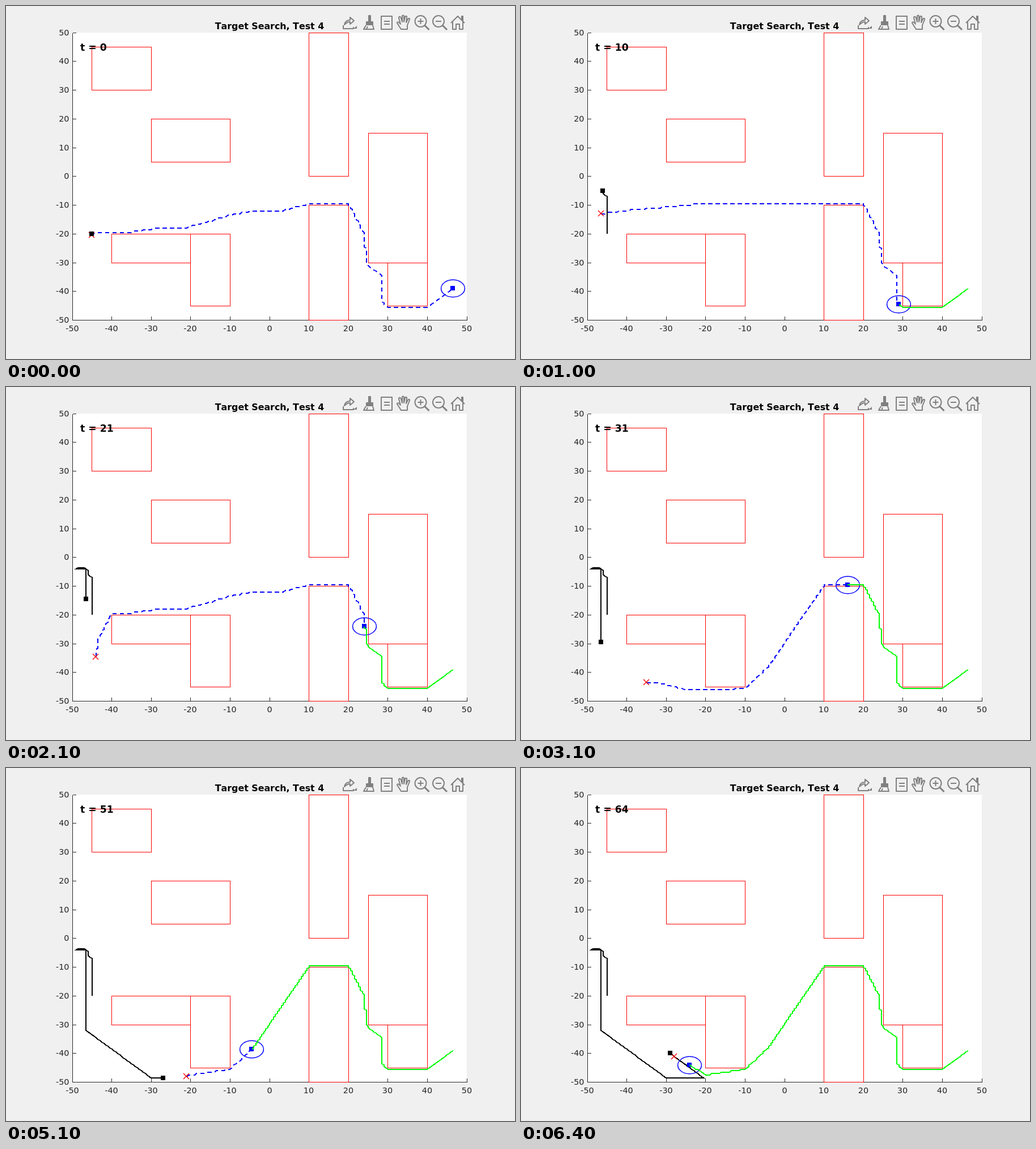
An HTML page for the animation above (7.4 s loop, 898 by 623 pixels).

```html
<!DOCTYPE html>
<html lang="en">
<head>
<meta charset="utf-8">
<title>Target Search</title>
<style>
  html, body { margin: 0; width: 100%; height: 100%; overflow: hidden; background: #f0f0f0; }
  svg { display: block; width: 898px; height: 623px; }
  text { font-family: "DejaVu Sans", sans-serif; font-size: 14.4px; fill: #262626; font-kerning: none; }
  .bold { font-weight: bold; fill: #000; }
  .crisp { shape-rendering: crispEdges; }
  path, ellipse { fill: none; }
</style>
</head>
<body>
<svg viewBox="0 0 898 623">
  <rect width="898" height="623" fill="#f0f0f0"/>
  <rect x="117" y="47" width="696" height="508" fill="#fff"/>
  <g id="axes"></g>
  <g id="walls" class="crisp" stroke="#f00"></g>
  <text class="bold" x="465" y="40.5" text-anchor="middle" style="font-size:15.85px">Target Search, Test 4</text>
  <g id="tools" fill="none" stroke="#808080" stroke-width="2" stroke-linejoin="round">
    <path d="M595 34v6h18v-3M597 33c1-6 5-8 10-8v-5l7 6-7 6v-4c-4 0-7 2-10 5z"/>
    <path d="M619 35v5h-6z" style="fill:#808080" stroke="none"/>
    <path d="M640 17h3v11h4v5h-11v-5h4z" style="fill:#808080"/>
    <path d="M635 34l-4 7h18l-2-7M638 36l-2 5"/>
    <path d="M662 18h19v23h-19zM667 27h10M667 32h10"/>
    <path d="M697 41l-7-11c0-3 3-2 6 2l-3-11c0-3 3-3 4 0l2 7v-10c0-2 3-2 3 0v10l2-9c1-2 4-1 3 1l-1 9 3-6c1-2 4-1 3 1l-4 10v7z"/>
    <path d="M785 30l12-12 12 12M788 28v13h6v-9h6v9h6v-13M804 24v-6h2v8"/>
  </g>
  <path id="plan" class="crisp" stroke="#00f" stroke-width="2" stroke-dasharray="7.5 5.5"/>
  <path id="evaderTrail" class="crisp" stroke="#000" stroke-width="2"/>
  <path id="goal" stroke="#f00" stroke-width="1.4" d="M-5 -5L5 5M-5 5L5 -5"/>
  <rect id="evader" x="-4" y="-4" width="8" height="8"/>
  <g id="seeker">
    <rect x="-4" y="-4" width="8" height="8" fill="#00f"/>
    <ellipse cx=".5" cy=".5" rx="20.9" ry="15.2" stroke="#00f" stroke-width="1.5"/>
  </g>
  <path id="seekerTrail" class="crisp" stroke="#0f0" stroke-width="2"/>
  <text id="clock" class="bold" x="131" y="79" style="font-size:17.3px"></text>
</svg>
<script>
const $ = id => document.getElementById(id);
const STEP = 100, LAST = 64, LOOP = 7400;
const px = x => 117 + (x + 50) * 6.96;
const py = y => 47 + (50 - y) * 5.077;
const hair = v => Math.floor(v) + 0.5;
const line = (pts, snap = Math.round) => 'M' + pts.map(([x, y]) => snap(px(x)) + ' ' + snap(py(y))).join('L');
const place = (id, [x, y]) =>
  $(id).setAttribute('transform', `translate(${Math.floor(px(x))} ${Math.floor(py(y))})`);

// Joins key points by staircases on a half-unit grid.
function route(keys) {
  const pts = [keys[0]];
  for (let k = 1; k < keys.length; k++) {
    const [ax, ay] = keys[k - 1], [bx, by] = keys[k];
    const n = 2 * Math.max(Math.abs(bx - ax), Math.abs(by - ay));
    const on = (a, b, i) => Math.round(2 * (a + (b - a) * i / n)) / 2;
    for (let i = 1; i <= n; i++) pts.push([on(ax, bx, i), on(ay, by, i)]);
  }
  return pts;
}

// Grid index after each tick: walk until the reach is covered, optionally keeping the surplus.
function schedule(pts, reach, carry) {
  const stops = [0];
  for (let t = 1, i = 0, left = 0; t <= LAST; t++) {
    let d = left;
    for (; d < reach && i < pts.length - 1; i++)
      d += Math.hypot(pts[i + 1][0] - pts[i][0], pts[i + 1][1] - pts[i][1]);
    left = carry ? d - reach : 0;
    stops.push(i);
  }
  return stops;
}

const gap = [10, -9.5], corner = [-10, -45.5], turn = [-20, -47.5], end = [-24, -44];
const seeker = route([[46.5, -39], [40, -45.5], [30, -45.5], [29, -44.5], [28.5, -43.5], [28.5, -34.5],
  [25.5, -31.5], [24.5, -30], [24, -20], [20, -9.5], gap, [4.5, -21], [-4.5, -38.5], corner, turn, end]);
const evader = route([[-45, -20], [-45, -7], [-46, -6], [-46, -4.5], [-47, -3.5], [-48.5, -3.5],
  [-49, -4], [-46.5, -4], [-46.5, -32], [-30, -48.5], [-20.5, -48.5], [-29, -40]]);
const seekerStops = schedule(seeker, 2.035, true);
const evaderStops = schedule(evader, 1.4, false);

// Each plan runs from the predicted goal to where it joins the seeker's route.
const ridge = [[-36, -19.5], [-28.5, -18], [-21.5, -18], [-10, -13.5], [-4, -12], [3, -12], gap];
const plans = [
  { from: 0, keys: [[-45, -20.5], [-44.5, -19.5], ...ridge] },
  { from: 1, keys: [[-46.5, -13], [-37.5, -11.5], [-21, -9.5], gap] },
  { from: 21, keys: [[-44, -34.5], [-43.5, -28.5], [-40, -19.5], ...ridge] },
  { from: 31, keys: [[-35, -43.5], [-32.5, -43.5], [-25, -46], [-15, -46], corner] },
  { from: 41, keys: [[-28.5, -48.5], [-25, -48.5], [-20, -46.5], corner] },
  { from: 51, keys: [[-21, -48], turn] },
  { from: 61, keys: [[-28, -41], [-25, -44], end] }
].map(({ from, keys }) => {
  const [x, y] = keys[keys.length - 1];
  return { from, pts: route(keys), join: seeker.findIndex(p => p[0] === x && p[1] === y) };
});

function drawStage() {
  const walls = [[-45, 30, 15, 15], [-30, 5, 20, 15], [-40, -30, 20, 10], [-20, -45, 10, 25],
    [10, 0, 10, 50], [10, -50, 10, 40], [25, -30, 15, 45], [30, -45, 10, 15]];
  $('walls').innerHTML = walls.map(([x, y, w, h]) =>
    `<path d="${line([[x, y], [x + w, y], [x + w, y + h], [x, y + h]], hair)}Z"/>`).join('');
  let d = line([[-50, 50], [-50, -50], [50, -50]], hair), labels = '';
  for (let v = -50; v <= 50; v += 10) {
    const x = hair(px(v)), y = hair(py(v));
    d += `M${x} 554v-6M118 ${y}h6`;
    labels += `<text x="${x - 0.5}" y="574" text-anchor="middle">${v}</text>` +
      `<text x="111.5" y="${y + 4.5}" text-anchor="end">${v}</text>`;
  }
  $('axes').innerHTML = `<path class="crisp" stroke="#262626" d="${d}"/>` + labels;
  $('tools').innerHTML += [['M-5 0h10M0-5v10', 731.5], ['M-5 0h10', 763]].map(([sign, x]) =>
    `<g transform="translate(${x} 27)"><circle r="10"/><path d="${sign}"/>` +
    '<path d="M7 7l8 8" stroke-width="3"/></g>').join('');
}

function draw(t) {
  const s = seekerStops[t], e = evaderStops[t];
  const plan = plans.filter(p => p.from <= t).pop();
  const ahead = seeker.slice(s, plan.join + 1).reverse();
  $('plan').setAttribute('d', line([...plan.pts, ...ahead]));
  $('seekerTrail').setAttribute('d', line(seeker.slice(0, s + 1)));
  $('evaderTrail').setAttribute('d', line(evader.slice(0, e + 1)));
  place('goal', plan.pts[0]);
  place('seeker', seeker[s]);
  place('evader', evader[e]);
  $('clock').textContent = 't = ' + t;
}

function tick() {
  draw(Math.min(LAST, Math.floor(performance.now() % LOOP / STEP)));
  requestAnimationFrame(tick);
}

drawStage();
tick();
</script>
</body>
</html>
```
